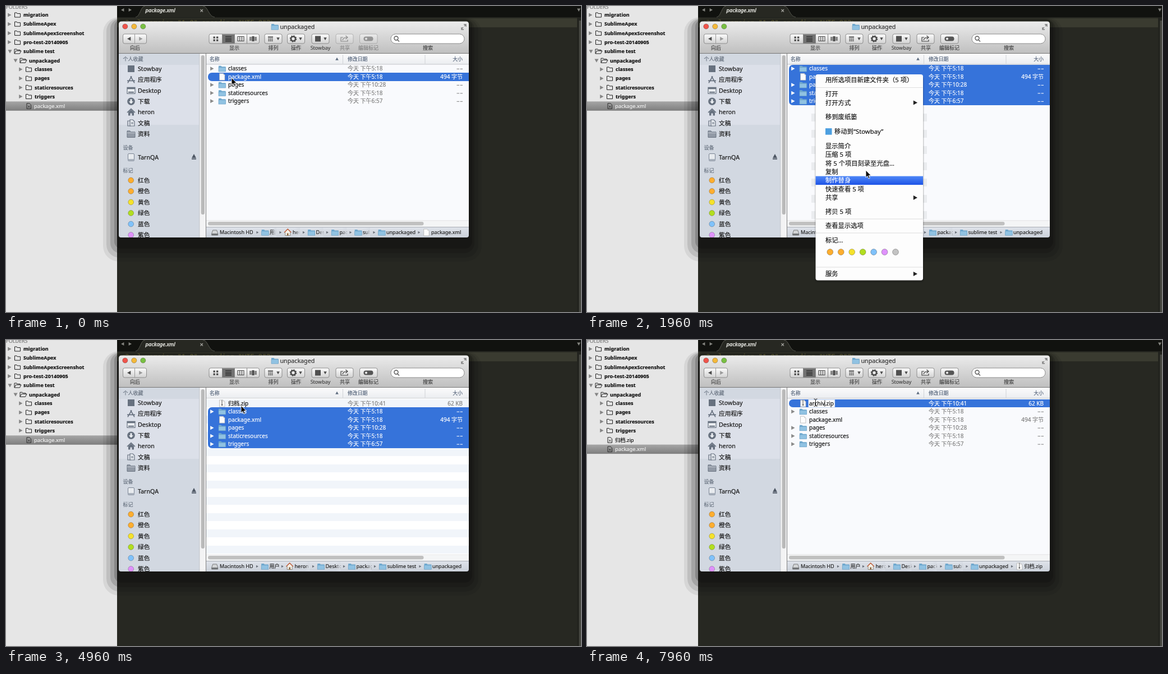
Recreate the animation shown at these times as an HTML page. Size 1025 by 546 pixels, loop 8 s.

```html
<!DOCTYPE html>
<html lang="zh-CN">
<head>
<meta charset="utf-8">
<title>Archive a package</title>
<style>
html, body { margin: 0; width: 100%; height: 100%; overflow: hidden; background: #272822; }
svg { display: block; }
#stage { width: 100%; height: 100%; }
text { font-family: "Noto Sans", "Noto Sans CJK SC", "Noto Sans CJK", sans-serif; fill: currentColor;
  stroke: currentColor; stroke-width: .18; white-space: pre; }
</style>
</head>
<body>
<svg id="stage" viewBox="0 0 1025 546">
  <defs>
    <linearGradient id="bar" x2="0" y2="1"><stop stop-color="#ececec"/><stop offset="1" stop-color="#bfbfbf"/></linearGradient>
    <linearGradient id="btn" x2="0" y2="1"><stop stop-color="#fcfcfc"/><stop offset="1" stop-color="#d2d2d2"/></linearGradient>
    <linearGradient id="head" x2="0" y2="1"><stop stop-color="#fbfbfc"/><stop offset="1" stop-color="#ebedf0"/></linearGradient>
    <linearGradient id="foot" x2="0" y2="1"><stop stop-color="#dfe3ea"/><stop offset="1" stop-color="#cbd1da"/></linearGradient>
    <linearGradient id="pick" x2="0" y2="1"><stop stop-color="#4f88f7"/><stop offset="1" stop-color="#1d53e6"/></linearGradient>
    <linearGradient id="row" x2="0" y2="1"><stop stop-color="#a6a6a6"/><stop offset="1" stop-color="#7e7e7e"/></linearGradient>
    <linearGradient id="fade"><stop stop-color="#d5dae2" stop-opacity="0"/><stop offset="1" stop-color="#d5dae2"/></linearGradient>
    <clipPath id="win"><path d="M201 32.5q0-5 5-5H820q5 0 5 5V409q0 4-4 4H205q-4 0-4-4Z"/></clipPath>
  </defs>
  <g id="back"></g><g id="tree"></g><g id="shade"></g>
  <g clip-path="url(#win)"><g id="frame"></g><g id="tools"></g><g id="list"></g><g id="path"></g></g>
  <g id="menu"></g><g id="pointer"></g>
</svg>
<script>
const $ = id => document.getElementById(id);
const rect = (x, y, w, h, fill, more = '') => `<rect x="${x}" y="${y}" width="${w}" height="${h}" fill="${fill}" ${more}/>`;
const line = (d, color, w = 1, more = '') => `<path d="${d}" fill="none" stroke="${color}" stroke-width="${w}" ${more}/>`;
const shape = (d, fill, more = '') => `<path d="${d}" fill="${fill}" ${more}/>`;
const dot = (x, y, r, fill, edge = 'none') => `<circle cx="${x}" cy="${y}" r="${r}" fill="${fill}" stroke="${edge}" stroke-width=".7"/>`;
// y is the middle of the line of text
const text = (x, y, s, size, color, more = '') =>
  `<text x="${x}" y="${y + size * .36}" font-size="${size}" color="${color}" ${more}>${s.replace(/</g, '&lt;')}</text>`;
const mid = 'text-anchor="middle"', end = 'text-anchor="end"';
const right = (x, y, c, s = 3.5) => shape(`M${x - s * .8} ${y - s}L${x + s} ${y}L${x - s * .8} ${y + s}Z`, c);
const left = (x, y, c, s = 3.5) => shape(`M${x + s * .8} ${y - s}L${x - s} ${y}L${x + s * .8} ${y + s}Z`, c);
const down = (x, y, c, s = 3.5) => shape(`M${x - s} ${y - s * .8}H${x + s}L${x} ${y + s}Z`, c);
const up = (x, y, c, s = 3) => shape(`M${x - s} ${y + s * .8}H${x + s}L${x} ${y - s}Z`, c);

const folder = (x, y) => shape(`M${x} ${y - 5}h4.5l1.2 1.5h6.8v8.5h-12.5Z`, '#6fa9cf') +
  rect(x, y - 2.2, 12.5, 7.4, '#90c2e2', 'stroke="#649bc2" stroke-width=".6"');
const page = (x, y, zip) => shape(`M${x} ${y - 6}h6.5l3 3v9h-9.5Z`, '#fcfcfc', 'stroke="#a9a9a9" stroke-width=".7"') +
  shape(`M${x + 6.5} ${y - 6}v3h3`, '#d8d8d8') +
  (zip ? line(`M${x + 4.5} ${y - 6}v7`, '#555', 1.8, 'stroke-dasharray="1 .8"') + rect(x + 3.3, y + 1, 2.6, 3, '#777') : '');
const home = (x, y) => shape(`M${x - .5} ${y}l6-6 6 6h-1.5v5.5h-9v-5.5Z`, '#f3efe6', 'stroke="#7d756a" stroke-width=".8"') +
  line(`M${x - .5} ${y}l6-6 6 6`, '#c05a35', 1.3) + rect(x + 4.2, y + 1.5, 2.6, 4, '#8b6844');
const disk = (x, y) => shape(`M${x + 2} ${y - 4}h7l2 6v3h-11v-3Z`, '#d2d4d6', 'stroke="#666" stroke-width=".8"') + rect(x, y + 2, 11, 3, '#727578');

/* editor and its tree */
function treeRow(depth, y, name, kind, on) {
  const x = [15, 25, 35][depth], ink = on ? '#f4f4f4' : '#111', open = kind === 'open';
  let s = on ? rect(0, y - 8, 198, 16.5, 'url(#row)') : '';
  if (kind === 'file') {
    s += line(`M${x + 2} ${y - 4.5}h5l2.5 2.5v7h-7.5Z`, on ? '#2c2c2c' : '#222', 1) +
      line(`M${x + 4} ${y - .5}l3.5 3.5m0-3.5l-3.5 3.5`, '#222', .9);
  } else {
    s += open ? down(x - 8, y, '#858585') : right(x - 9, y, '#858585');
    s += open ? line(`M${x} ${y + 4}v-8h4l1 1.5h5v2M${x} ${y + 4}l2.5-5h9.5l-2.5 5Z`, '#222')
              : line(`M${x + .5} ${y + 4}v-8h3.6l1 1.5h5.4v6.5Z`, '#222');
  }
  return s + text(x + (kind === 'file' ? 15 : 16), y, name, kind === 'file' ? 9.3 : 9, ink, kind === 'file' ? '' : 'font-weight="700" stroke-width="0"');
}

function drawBack() {
  const names = ['migration', 'SublimeApex', 'SublimeApexScreenshot', 'pro-test-20140905'];
  const subs = ['classes', 'pages', 'staticresources', 'triggers'];
  $('back').innerHTML = rect(0, 0, 1025, 546, '#272822') + rect(198, 0, 827, 20, '#11120f') +
    rect(198, 22, 820, 16, '#3a3b30') +
    shape('M231 20.5C239 19 240 0 248 0H351C360 0 361 19 372 20.5Z', '#272822') +
    line('M231 20C239 19 240 0 248 0M351 0C360 0 361 19 372 20', '#55564e') +
    left(208, 7, '#84847f', 3) + right(221, 7, '#84847f', 3) + down(1021, 7, '#84847f', 3) +
    text(248.5, 8, 'package.xml', 9.5, '#f3f3ee', 'font-style="italic" style="stroke-width:.35"') +
    line('M346.5 6l4.5 4.5m0-4.5l-4.5 4.5', '#aaaaa5', 1.1) +
    text(205, 29.5, '<?xml version="1.0" encoding="UTF-8"?>', 12, '#8a8648', 'style="font-family:\'Noto Sans Mono\',monospace"') +
    rect(1018, 20, 7, 526, '#22231e') + rect(1021.5, 26, 3.5, 520, '#484943') +
    rect(0, 0, 198, 546, '#e6e6e6') +
    text(0, 1.5, 'FOLDERS', 9, '#777') +
    names.map((n, i) => treeRow(0, 16 + i * 16.2, n, 'dir')).join('') +
    treeRow(0, 81, 'sublime test', 'open') + treeRow(1, 97.3, 'unpackaged', 'open') +
    subs.map((n, i) => treeRow(2, 113 + i * 16.2, n, 'dir')).join('');
  $('shade').innerHTML = [[173, 20, 675, 436], [179, 22, 663, 427], [186, 23, 649, 418], [193, 24, 638, 409]]
    .map(([x, y, w, h], i) => rect(x, y, w, h, '#000', `opacity="${.07 + i * .035}" rx="${28 - i * 5}"`)).join('');
}

/* file browser */
const tags = ['#ffae2f', '#ffae2f', '#f5e22c', '#b2de20', '#80c2fa', '#df92fb'];
const button = (x, w, icon) => rect(x + .5, 50, w, 17, 'url(#btn)', 'rx="3" stroke="#858585" stroke-width=".9"') + icon;

function sideIcon(i, y) {
  const c = '#67717f', x = 216;
  return [
    rect(x + 1, y - 6, 12, 12, c),
    line(`M${x + 1} ${y + 6}L${x + 8} ${y - 6}M${x + 6} ${y - 6}L${x + 13} ${y + 6}M${x} ${y + 2}h14`, c, 1.7),
    rect(x, y - 5.5, 14, 11, '#eceff3', `stroke="${c}" stroke-width="1.2"`) + rect(x, y - 5.5, 14, 3, c) + rect(x + 2, y + 2, 10, 2, c),
    dot(x + 7, y, 6.8, c) + shape(`M${x + 5.5} ${y - 4}h3v4h2.6l-4.1 4.4-4.1-4.4h2.6Z`, '#eef1f5'),
    line(`M${x} ${y + .5}l7-6.5 7 6.5`, c, 1.5) + shape(`M${x + 2} ${y}l5-4.5 5 4.5v6h-3.5v-4h-3v4h-3.5Z`, c),
    line(`M${x + 1} ${y - 4}h5v9h-5Z`, c, 1.2) + shape(`M${x + 5} ${y - 6}h5l3 3v8h-8Z`, '#e6eaef', `stroke="${c}" stroke-width="1.2"`) + line(`M${x + 7} ${y - 1}h4m-4 2h4`, c),
    shape(`M${x} ${y - 5.5}h5l1.5 2h7.5v9.5h-14Z`, '#929aa6', `stroke="${c}"`) + line(`M${x} ${y - 2}h14`, '#c7ccd4')
  ][i];
}

function drawFrame() {
  const ink = '#4a4a4a';
  const favs = ['Stowbay', '应用程序', 'Desktop', '下载', 'heron', '文稿', '资料'];
  const hues = ['红色', '橙色', '黄色', '绿色', '蓝色', '紫色'];
  let s = rect(201, 27, 624, 58, 'url(#bar)') + rect(201, 84, 624, 1, '#777');
  ['#f0544b', '#f5b93a', '#79c043'].forEach((c, i) => s += dot(212.3 + i * 16, 36.5, 4.6, c, '#00000066'));
  s += folder(473, 37) + text(488.5, 37, 'unpackaged', 10.7, '#333');
  s += line('M812 41l3-3m2-2l3-3m-4 0h4v4m-8 1v4h4', '#7c7c7c', 1.3);
  s += button(208, 42, left(219.5, 58.5, ink, 3.5) + right(240, 58.5, '#9b9b9b', 3.5) + line('M229.5 50v17', '#999'));
  let grid = '';
  for (let i = 0; i < 4; i++) grid += rect(369.5 + i % 2 * 5.5, 54.5 + (i >> 1) * 5, 3.3, 3.3, ink);
  s += button(361.5, 89.5, grid + rect(386, 50.5, 21.5, 16.3, '#727272') + line('M391 54.5h11m-11 2.7h11m-11 2.7h11m-11 2.7h11', '#222', 1.1) +
    line('M413 54.5h11v8h-11Zm3.7 0v8m3.7-8v8', ink, 1.1) + line('M435 55v7m2-7v7m7-7v7m2-7v7', ink, 1.2) + rect(438.5, 54, 4, 9, ink) +
    line('M385.5 50v17m22-17v17m22-17v17', '#888'));
  s += button(460.5, 31, rect(467, 54.5, 9, 2, ink) + line('M468.5 58v5.5m3-5.5v5.5m3-5.5v5.5', ink, 2, 'stroke-dasharray="2 1"') + down(485, 58.5, ink, 2.7));
  s += button(501, 31, line('M516 58.5a4 4 0 1 1-8 0a4 4 0 1 1 8 0', ink, 2.6) + line('M517.5 58.5a5.5 5.5 0 1 1-11 0a5.5 5.5 0 1 1 11 0', ink, 1.6, 'stroke-dasharray="2 2.3"') + down(525, 58.5, ink, 2.7));
  s += button(544.5, 31, rect(551, 53.5, 10, 10, '#4f4f4f') + down(569, 58.5, ink, 2.7));
  s += rect(686, 50, 131, 17, '#fff', 'rx="8.5" stroke="#8b8b8b"') + line('M699 57.5a3.5 3.5 0 1 1-7 0a3.5 3.5 0 1 1 7 0M698 60.5l3 3', '#555', 1.4);
  [[230, '向后'], [407, '显示'], [476.5, '排列'], [517, '操作'], [560.5, 'Stowbay'], [752, '搜索']]
    .forEach(([x, n]) => s += text(x, 74.5, n, 9, '#444', mid));

  s += rect(201, 85, 145, 328, '#d2d8e1') + rect(201, 105, 143, 107, '#dce0e9');
  s += text(208.5, 95, '个人收藏', 9, '#66707e') + text(208.5, 253, '设备', 9, '#66707e') + text(208.5, 294, '标记', 9, '#66707e');
  favs.forEach((n, i) => { const y = 112 + i * 19.4; s += sideIcon(i, y) + text(235, y, n, 10.7, '#151515'); });
  s += rect(217.5, 263.5, 11, 13, '#e7eaee', 'rx="1.5" stroke="#7b8593"') + rect(217.5, 273, 11, 3.5, '#aab2bd') +
    text(235, 270, 'TarnQA', 10.7, '#151515') + up(335, 268, '#4d5663', 4) + rect(331, 272, 8, 1.7, '#4d5663');
  hues.forEach((n, i) => { const y = 311 + i * 19.5; s += dot(222.7, y, 4.9, tags[i], '#00000055') + text(235, y, n, 10.7, '#151515'); });

  s += rect(345, 85, 11, 328, '#f3f3f4') + rect(344.5, 85, .8, 328, '#b9bdc4') + rect(347.7, 88, 6.3, 284, '#bababa', 'rx="3.1"') + rect(356, 85, 1.2, 328, '#808080');
  s += rect(357, 85, 468, 298, '#f9fafd') + rect(357, 85, 468, 19, 'url(#head)') + rect(357, 103.5, 468, 1, '#c3c6ca');
  s += line('M600.5 87v16M747 87v16', '#cfd2d6') + up(590, 94.5, '#5f6d80', 2.8);
  s += text(363, 94.5, '名称', 8.9, '#56657b') + text(609, 94.5, '修改日期', 8.9, '#56657b') + text(814, 94.5, '大小', 8.9, '#56657b', end);
  s += rect(357, 383, 468, 11, '#f4f5f6') + rect(357, 382.5, 468, .8, '#dcdcdc') + rect(360, 385, 384.5, 6.6, '#c0c0c0', 'rx="3.3"');
  s += rect(357, 394, 468, 19, 'url(#foot)') + rect(357, 394, 468, 1, '#a9adb4');
  $('frame').innerHTML = s;
}

const drawTools = on => `<g opacity="${on ? 1 : .5}">` +
  button(587.5, 31, line('M601 56h-4v7h12v-3M600 61c1-4 4-5 8-5m-2.5-3l3.5 3-3.5 3', '#444', 1.2)) +
  button(630, 31.5, rect(637.5, 54.5, 17, 8, '#555', 'rx="4"') + dot(642, 58.5, 2, '#eee')) +
  text(604, 74.5, '共享', 9, '#444', mid) + text(646, 74.5, '编辑标记', 9, '#444', mid) + '</g>';

const files = [['classes', '5:18'], ['package.xml', '5:18', '494 字节'], ['pages', '10:28'], ['staticresources', '5:18'], ['triggers', '6:57']];

function drawList(st) {
  const rows = st.zip ? [['归档.zip', '10:41', '62 KB'], ...files] : files;
  const top = st.zip ? 105.9 : 104.6, h = 14.5, [a, b] = st.sel;
  const edge = i => Math.round(top + i * h);
  let s = '';
  if (st.stripes) {
    s += rect(357, 104.5, 468, 278, '#fff');
    for (let i = 0; edge(i) < 383; i += 2) s += rect(357, edge(i), 468, Math.min(edge(i + 1), 383) - edge(i), '#f1f5fa');
  }
  if (st.edges) {
    for (let i = 6; i < 19; i += 2) s += rect(400, edge(i), 206, edge(i + 1) - edge(i), '#eaecef');
    s += rect(407, 185, 192, 198, '#f9fafd');
  }
  s += shape(`M825 ${edge(a)}H367a7 7 0 0 0 -7 7V${edge(b + 1) - 7}a7 7 0 0 0 7 7H825Z`, '#3673da');
  rows.forEach(([name, time, size], i) => {
    const y = top + (i + .5) * h, on = i >= a && i <= b, soft = on ? '#fff' : '#7f7f7f';
    s += size ? page(380.5, y, name.endsWith('zip')) : right(367, y, on ? '#fff' : '#8a8a8a') + folder(379, y);
    if (!(st.edit && i === 0)) s += text(396, y, name, 10, on ? '#fff' : '#111');
    s += text(609, y, '今天 下午' + time, 10, soft);
    s += size ? text(814, y, size, 10, soft, end) : line(`M803.5 ${y + .5}h4.5m1.5 0h4.5`, soft);
  });
  $('list').innerHTML = s;
  if (st.edit) drawField(st.edit, top, h);
}

function drawField(stem, top, h) {
  const y = top + h / 2, picked = stem === '归档';
  $('list').innerHTML += text(396, y, stem + '.zip', 10, '#111', 'id="name"');
  const name = $('name'), w = name.getComputedTextLength(), at = name.getSubStringLength(0, stem.length);
  name.insertAdjacentHTML('beforebegin', rect(394.8, top + .3, w + 3.2, h - .6, '#fff', 'stroke="#9dbbe8" stroke-width=".6"') +
    (picked ? rect(396, top + 1, at, h - 2, '#a8cbf3') : rect(396 + at - .3, top + 1.5, .9, h - 3, '#111')));
}

// kind, label, label x, visible width
const paths = {
  file: [['d', 'Macintosh HD', 381], ['f', '用户', 470, 12], ['h', 'heron', 511, 13], ['f', 'Desktop', 552.5, 13], ['f', 'package', 594.5, 13],
    ['f', 'sublime test', 636, 13], ['f', 'unpackaged', 678], ['p', 'package.xml', 758]],
  dir: [['d', 'Macintosh HD', 381], ['f', '用户', 469.5], ['h', 'heron', 514.5, 27], ['f', 'Desktop', 569.5, 27], ['f', 'package', 624.5, 27],
    ['f', 'sublime test', 679.5], ['f', 'unpackaged', 760]],
  zip: [['d', 'Macintosh HD', 381], ['f', '用户', 469.5], ['h', 'heron', 514.5, 17], ['f', 'Desktop', 560.5, 18], ['f', 'package', 606.5, 17],
    ['f', 'sublime test', 653, 17], ['f', 'unpackaged', 699], ['z', '归档.zip', 779.5]]
};
const drawPath = items => items.map(([kind, label, x, w], i) => {
  const ix = x - 14.3, y = 404;
  const icon = { d: disk(ix, y), f: folder(ix, y), h: home(ix, y), p: page(ix + 1, y), z: page(ix + 1, y, true) }[kind];
  const name = w ? `<svg x="${x}" y="394" width="${w}" height="19">${text(0, 10, label, 9, '#222')}${rect(w - 9, 1.5, 9, 17, 'url(#fade)')}</svg>`
    : text(x, y, label, 9, '#222');
  return (i ? right(ix - 7.5, y, '#6c727b', 2.2) : '') + icon + name;
}).join('');

const items = [['用所选项目新建文件夹（5 项）', 132], ['打开', 157], ['打开方式', 172.5, 1], ['移到废纸篓', 198], ['移动到“Stowbay”', 223.7],
  ['显示简介', 249.5], ['压缩 5 项', 265], ['将 5 个项目刻录至光盘…', 280.5], ['复制', 296], ['制作替身', 311.3], ['快速查看 5 项', 326.7],
  ['共享', 342, 1], ['拷贝 5 项', 367], ['查看显示选项', 392], ['标记…', 417.5], ['服务', 478, 1]];

function drawMenu(alpha, pick) {
  if (!alpha) return '';
  let s = rect(405.5, 125, 195.5, 369, '#000', 'rx="6" opacity=".1"') + rect(407, 122, 192.5, 368.5, '#000', 'rx="5" opacity=".15"') +
    rect(407.5, 122, 191.5, 367.5, '#fdfdfd', 'rx="4"');
  [145.5, 380, 405, 466].forEach(y => s += rect(408, y - .5, 190.5, 1, '#dedede'));
  items.forEach(([name, y, sub], i) => {
    const on = name === pick, ink = on ? '#fff' : '#161616';
    if (on) s += rect(407.5, y - 7.7, 191.5, 15.5, 'url(#pick)');
    if (i === 4) s += rect(425, y - 5.5, 11.5, 11.5, '#4c9fe0');
    s += text(i === 4 ? 441 : 425, y, name, 11.3, ink) + (sub ? right(585, y, on ? '#fff' : '#222', 4) : '');
  });
  [...tags, '#c3c3c3'].forEach((c, i) => s += dot(433.3 + i * 19.45, 439, 5.4, c, '#00000066'));
  return `<g opacity="${alpha}">${s}</g>`;
}

const drawPointer = (x, y, beam) => beam
  ? line('M404.5 105q3 0 3 2.5q0-2.5 3-2.5M407.5 107v9M404.5 118.5q3 0 3-2.5q0 2.5 3 2.5', '#222', 1)
  : shape('M0 0V13L3 10.3 5 15 7.2 14.1 5.2 9.6H9.3Z', '#0a0a0a', `stroke="#fff" stroke-width=".9" transform="translate(${x} ${y})"`);

/* each entry changes the state from its time on */
const steps = [
  [0, { at: [402, 128], sel: [1, 1], path: 'file', tools: false, menu: 0, pick: '', zip: false, stripes: false, edges: false, tree: false, edit: '', beam: false }],
  [150, { at: [403, 128] }],
  [320, { at: [404, 127] }],
  [470, { at: [405, 126], sel: [0, 4], path: 'dir' }],
  [620, { at: [406, 125] }],
  [770, { at: [406, 124] }],
  [920, { at: [407, 122], tools: true }],
  [1070, { at: [428, 167], menu: 1, pick: '打开方式', edges: true }],
  [1220, { at: [440, 195], pick: '移到废纸篓' }],
  [1370, { at: [456, 255], pick: '显示简介' }],
  [1510, { at: [476, 335], pick: '快速查看 5 项' }],
  [1660, { at: [492, 374], pick: '拷贝 5 项' }],
  [1810, { at: [497, 336], pick: '共享' }],
  [1960, { at: [497, 293], pick: '制作替身' }],
  [2110, { at: [497, 277], pick: '将 5 个项目刻录至光盘…' }],
  [2260, { at: [497, 268], pick: '压缩 5 项' }],
  [2410, { at: [497, 265] }],
  [3460, { at: [497, 264] }],
  [3760, { at: [497, 265] }],
  [4060, { pick: '' }],
  [4210, { menu: .58, pick: '压缩 5 项' }],
  [4360, { menu: 0, edges: false }],
  [4510, { at: [482, 236] }],
  [4660, { at: [456, 182] }],
  [4810, { at: [430, 132], zip: true, sel: [1, 5], stripes: true }],
  [4960, { at: [419, 117] }],
  [5110, { at: [412, 112] }],
  [5260, { at: [408, 110], sel: [0, 0], path: 'zip', stripes: false }],
  [5410, { tree: true }],
  [5560, { at: [407, 109.5] }],
  [6310, { edit: '归档' }],
  [7210, { edit: 'ar', beam: true }],
  [7510, { edit: 'arc' }],
  [7660, { edit: 'arch' }],
  [7810, { edit: 'archi' }],
  [7960, { edit: 'archiv' }]
];

function draw(n) {
  const st = Object.assign({}, ...steps.slice(0, n).map(s => s[1]));
  $('tree').innerHTML = (st.tree ? treeRow(2, 178.3, '归档.zip', 'file') : '') +
    treeRow(2, st.tree ? 194.6 : 178.3, 'package.xml', 'file', true);
  $('tools').innerHTML = drawTools(st.tools);
  drawList(st);
  $('path').innerHTML = drawPath(paths[st.path]);
  $('menu').innerHTML = drawMenu(st.menu, st.pick);
  $('pointer').innerHTML = drawPointer(...st.at, st.beam);
}

let shown = -1;
const start = performance.now();
function tick() {
  const t = (performance.now() - start) % 8000;
  const n = steps.filter(s => s[0] <= t).length;
  if (n !== shown) draw(shown = n);
  requestAnimationFrame(tick);
}
drawBack();
drawFrame();
tick();
</script>
</body>
</html>
```
